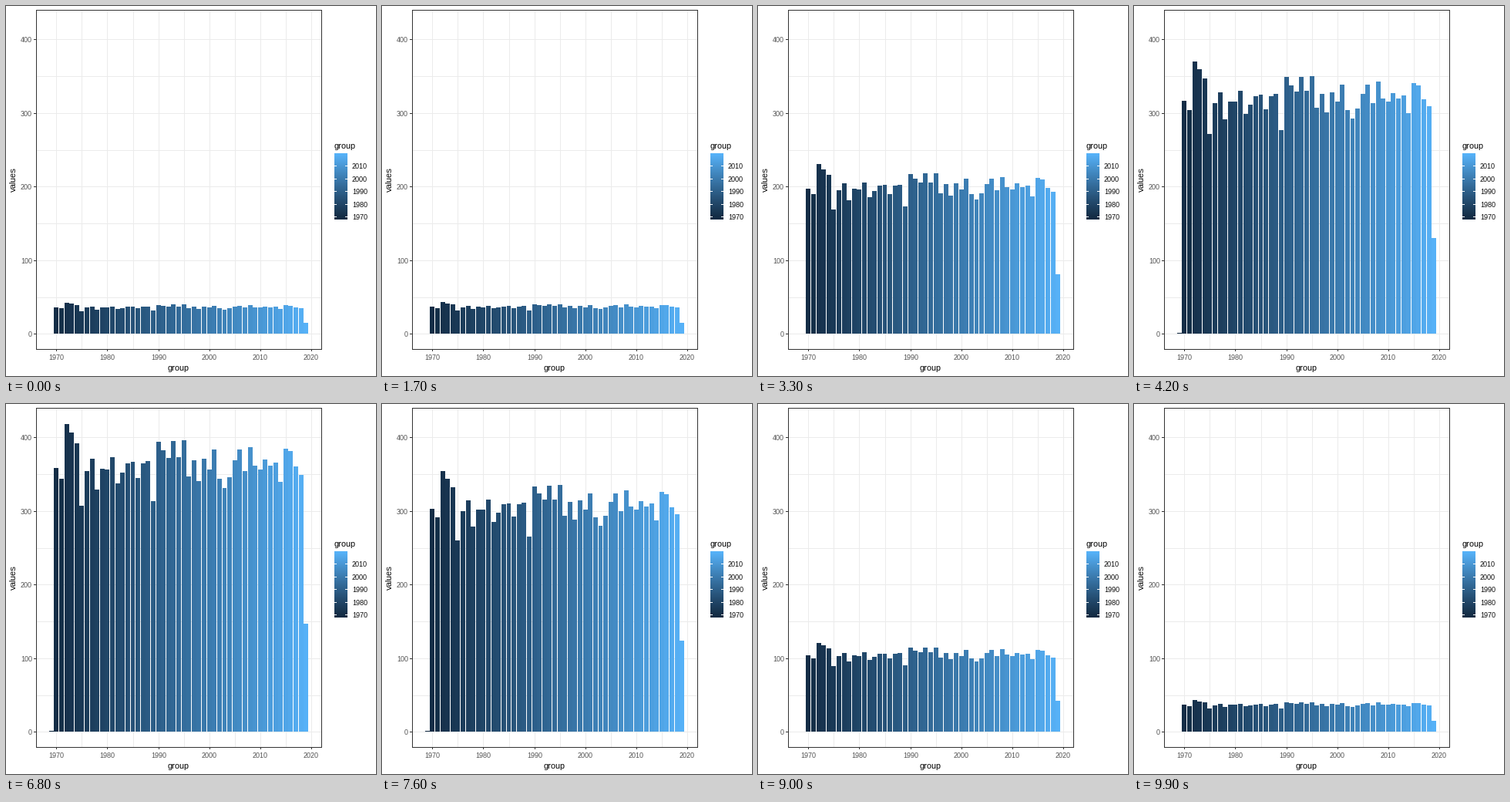
Animation, 480 px wide and 480 px high, one loop 10 s. Source, as a matplotlib script:

```python
import math

import matplotlib.pyplot as plt
import numpy as np
from matplotlib.animation import FuncAnimation
from matplotlib.patches import Rectangle

plt.rcParams.update({"font.family": "Liberation Sans", "text.hinting": "native",
                     "text.hinting_factor": 1})

SIZE, DPI = 480, 100
FRAMES, INTERVAL = 100, 100
LEFT, TOP, RIGHT, BOTTOM = 39, 5, 409, 445       # panel border
X_1970, YEAR_STEP = 65.85, 6.61
Y_ZERO, VALUE_STEP = 425.75, 400 / 419
FIRST_YEAR, LAST_YEAR = 1969, 2019

VALUES = np.array([
    1, 359, 345, 419, 407, 393, 308, 355, 372, 330, 358, 357, 374, 338, 353, 366, 368,
    346, 366, 369, 314, 395, 383, 373, 396, 374, 397, 348, 370, 341, 372, 357, 384, 345,
    332, 347, 370, 384, 355, 388, 362, 357, 371, 362, 367, 340, 386, 382, 361, 350, 147])

RGB_TO_XYZ = np.array([[.4124564, .3575761, .1804375],
                       [.2126729, .7151522, .0721750],
                       [.0193339, .1191920, .9503041]])
WHITE_POINT = RGB_TO_XYZ.sum(axis=1)


def to_lab(rgb):
    c = np.array(rgb) / 255
    linear = np.where(c > .04045, ((c + .055) / 1.055) ** 2.4, c / 12.92)
    t = RGB_TO_XYZ @ linear / WHITE_POINT
    fx, fy, fz = np.where(t > .008856, np.cbrt(t), 7.787 * t + 16 / 116)
    return np.array([116 * fy - 16, 500 * (fx - fy), 200 * (fy - fz)])


def to_rgb(lab):
    fy = (lab[0] + 16) / 116
    f = np.array([fy + lab[1] / 500, fy, fy - lab[2] / 200])
    xyz = np.where(f > .2069, f ** 3, (f - 16 / 116) / 7.787) * WHITE_POINT
    c = np.clip(np.linalg.solve(RGB_TO_XYZ, xyz), 0, 1)
    return np.clip(np.where(c > .0031308, 1.055 * c ** (1 / 2.4) - .055, 12.92 * c), 0, 1)


DARK, LIGHT = to_lab((0x13, 0x2B, 0x43)), to_lab((0x56, 0xB1, 0xF7))


def gradient(t):
    return to_rgb(DARK + (LIGHT - DARK) * t)


def x_of(year):
    return X_1970 + (year - 1970) * YEAR_STEP


def y_of(value):
    return Y_ZERO - value * VALUE_STEP


fig = plt.figure(figsize=(SIZE / DPI, SIZE / DPI), dpi=DPI, facecolor="white")
ax = fig.add_axes([0, 0, 1, 1])
ax.set(xlim=(0, SIZE), ylim=(SIZE, 0))
ax.axis("off")


def box(x0, y0, x1, y1, color, z=1):
    """Fill whole pixels from (x0, y0) up to, not including, (x1, y1)."""
    patch = Rectangle((x0, y0), x1 - x0, y1 - y0, facecolor=color, linewidth=0,
                      antialiased=False, zorder=z)
    return ax.add_patch(patch)


def label(x, y, text, px, color="black", ha="left", **style):
    ax.text(x, y, text, fontsize=px * 72 / DPI, color=color, ha=ha,
            **{"va": "baseline", **style})


def draw_panel():
    grid, edge, tick_text = "#EBEBEB", "#333333", "#4D4D4D"
    for year in range(1970, 2021, 5):
        x = int(x_of(year))
        box(x, TOP, x + 1, BOTTOM, grid)
        if year % 10 == 0:
            box(x, BOTTOM, x + 1, BOTTOM + 3, edge)
            label(x, 459, str(year), 9, tick_text, "center")
    for value in range(0, 401, 50):
        y = int(y_of(value))
        box(LEFT, y, RIGHT, y + 1, grid)
        if value % 100 == 0:
            box(LEFT - 3, y, LEFT, y + 1, edge)
            label(34, y + 4, str(value), 9, tick_text, "right")
    for x in (LEFT, RIGHT):
        box(x, TOP, x + 1, BOTTOM + 1, edge, 4)
    for y in (TOP, BOTTOM):
        box(LEFT, y, RIGHT + 1, y + 1, edge, 4)
    label(224, 473, "group", 11, ha="center")
    label(15, 225, "values", 11, ha="right", rotation=90, va="center")


def draw_legend():
    x0, x1, y0, height, bins = 426, 443, 191, 86, 20
    colors = np.array([gradient(i / (bins - 1)) for i in range(bins)])
    position = (height - .5 - np.arange(height)) / height * bins - .5
    ramp = [np.interp(position, np.arange(bins), colors[:, c]) for c in range(3)]
    ax.imshow(np.stack(ramp, axis=-1)[:, None, :], extent=(x0, x1, y0 + height, y0),
              aspect="auto", interpolation="nearest", zorder=2)
    ax.set(xlim=(0, SIZE), ylim=(SIZE, 0))
    label(x0, 185, "group", 11)
    for year in range(1970, 2011, 10):
        y = int(275.24 - 1.6416 * (year - FIRST_YEAR))
        box(x0, y, x0 + 3, y + 1, "white", 3)
        box(x1 - 3, y, x1, y + 1, "white", 3)
        label(449, y + 4, str(year), 9)


def make_bar(year):
    t = (year - FIRST_YEAR) / (LAST_YEAR - FIRST_YEAR)
    left, right = int(x_of(year - .45)), int(x_of(year + .45))
    return box(left, int(Y_ZERO), right, int(Y_ZERO), gradient(t), 2)


draw_panel()
draw_legend()
bars = [make_bar(year) for year in range(FIRST_YEAR, LAST_YEAR + 1)]


def growth(frame):
    """Rest low, rise with sine easing, rest high, fall back."""
    if frame <= 50:
        t = max(0, frame - 16) / 34
    else:
        t = min(1, (100 - frame) / 33)
    return (1 - math.cos(math.pi * t)) / 2


def update(frame):
    scale = .1 + .9 * growth(frame)
    for bar, value in zip(bars, VALUES):
        top = int(y_of(value * scale))
        bar.set_y(top)
        bar.set_height(int(Y_ZERO) - top)
    return bars


animation = FuncAnimation(fig, update, frames=FRAMES, interval=INTERVAL,
                          init_func=lambda: update(0), repeat=True, repeat_delay=0)
plt.show()
```
